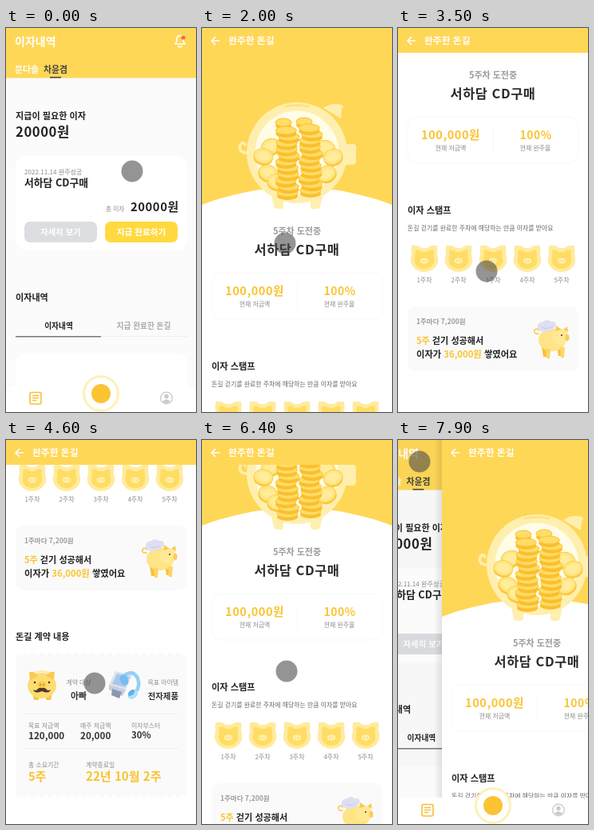
Animation, 238 px wide and 480 px high, one loop 8000 ms. Source, as an HTML page:

```html
<!DOCTYPE html>
<html lang="ko">
<head>
<meta charset="utf-8">
<style>
html, body { margin: 0; width: 100%; height: 100%; overflow: hidden; background: #fff; }
svg { display: block; width: 238px; height: 480px; font-family: "Noto Sans CJK KR", "Noto Sans CJK JP", "Noto Sans CJK", sans-serif; }
.wide { letter-spacing: .035em; }
</style>
</head>
<body>
<svg id="stage" viewBox="0 0 238 480"></svg>
<script>
const YELLOW = '#ffd757', GOLD = '#fac32f', INK = '#222', GRAY = '#8c8c8c', LIGHT = '#9b9b9b';

const text = (x, y, size, str, fill = INK, weight = 700, anchor = 'start') =>
  `<text x="${x}" y="${y}" font-size="${size}" fill="${fill}" font-weight="${weight}" text-anchor="${anchor}">${str}</text>`;
const small = (x, y, str, anchor, size = 7.9) => text(x, y, size, str, GRAY, 400, anchor);
const wide = (...args) => `<g class="wide">${text(...args)}</g>`;
const rect = (x, y, w, h, fill, r = 0, more = '') =>
  `<rect x="${x}" y="${y}" width="${w}" height="${h}" rx="${r}" fill="${fill}" ${more}/>`;
const oval = (x, y, rx, ry, fill, more = '') =>
  `<ellipse cx="${x}" cy="${y}" rx="${rx}" ry="${ry}" fill="${fill}" ${more}/>`;
const dot = (x, y, r, fill, more) => oval(x, y, r, r, fill, more);
const path = (d, fill, more = '') => `<path d="${d}" fill="${fill}" ${more}/>`;
const line = (d, color, width, more = '') =>
  path(d, 'none', `stroke="${color}" stroke-width="${width}" stroke-linecap="round" stroke-linejoin="round" ${more}`);
const range = (n, f) => Array.from({ length: n }, (_, i) => f(i)).join('');

function listPage() {
  return rect(0, 0, 238, 480, '#fbfbfb') + rect(0, 0, 238, 62.5, YELLOW) +
    text(11, 22, 14, '이자내역', '#fff') +
    line('M212 20h12c-2-2-2-4-2-6c0-6-8-6-8 0c0 2 0 4-2 6zM216 23q2 1.5 4 0', '#fff', 1.6) +
    dot(222, 12, 2.6, '#f4694f') +
    text(11, 56, 10.9, '문다솔', '#fff') + text(47, 56, 10.9, '차윤겸', '#444') +
    rect(55, 61, 14, 1.5, '#444') +
    text(12, 114, 11.1, '지급이 필요한 이자') + wide(12, 136, 16.7, '20000원') +
    rect(12, 160, 215, 118, '#fff', 14) +
    small(23, 183, '2022.11.14 완주성공', 'start', 8.1) +
    text(23, 198, 12.8, '서하담 CD구매') +
    small(125, 229, '총 이자', 'start', 7.7) + wide(156, 229, 14.8, '20000원') +
    rect(23, 242, 91, 26, '#dcdde1', 7) + text(68.5, 258.5, 10.4, '자세히 보기', '#fff', 700, 'middle') +
    rect(124, 242, 91, 26, '#ffd93f', 7) + text(169.5, 258.5, 10.6, '지급 완료하기', '#fff', 700, 'middle') +
    text(12, 341, 11.1, '이자내역') +
    text(66, 376, 9.7, '이자내역', INK, 700, 'middle') +
    text(172.5, 376, 9.7, '지급 완료한 돈길', '#aaa', 700, 'middle') +
    rect(119, 385, 108, 1, '#eee') + rect(12, 385, 107, 1.5, '#777') +
    rect(12, 407, 215, 90, '#fff', 12);
}

function navBar() {
  return rect(0, 447, 238, 50, '#fff', 10) +
    line('M32 455.5h10q2 0 2 2v10.500q0 2-2 2h-10q-2 0-2-2v-10.500q0-2 2-2zM33.5 459.5h7M33.5 462.5h7M33.5 465.5h4', '#f7be39', 1.6) +
    dot(119, 457, 21.5, '#fff', 'stroke="#fff0b8" stroke-width="3"') + dot(119, 457, 12, '#fcc433') +
    dot(201, 462.5, 7.3, '#fff', 'stroke="#c9c9ce" stroke-width="1.3"') +
    dot(201, 460.5, 2.7, '#c9c9ce') + path('M196 467q5-5.5 10 0q-5 4-10 0z', '#c9c9ce');
}

const coin = (x, y, rx = 13) =>
  oval(x, y + 4, rx, 5, '#fbbf2e') +
  oval(x, y, rx, 5, '#ffdd66', 'stroke="#fcc437" stroke-width="1"');
const loose = (x, y, turn) => `<g transform="translate(${x} ${y}) rotate(${turn})">` +
  oval(0, 2.5, 12, 9.5, '#fbc63d') + oval(0, 0, 12, 9.5, '#ffe680', 'stroke="#fdce50" stroke-width="1"') +
  oval(0, 0, 8.5, 6, '#ffed9b') + '</g>';
const stack = (x, top, n, step) => range(n, i =>
  coin(x + Math.sin(i * 2.3) * 2, top + (n - 1 - i) * step));

function jar() {
  const pale = '#ffefae';
  return path('M152 100q10-7 23-4q4 2 0 5l-1 12z', pale) +
    path('M178 145h11q4 0 4 4v17q0 5-5 5h-10z', pale) +
    line('M57 156q-12 0-9-10q3-5 6 0', pale, 3.5) +
    path('M87 210l3 13q1 3 4 3h5q3 0 3-4v-8zM151 210l-3 13q-1 3-4 3h-5q-3 0-3-4v-8z', pale) +
    dot(119, 156, 63, pale) + dot(119, 156, 52.5, '#fffce8') +
    line('M104 98q15-3 30 0', '#ffe07c', 2.5) +
    loose(86, 148, -20) + loose(77, 160, 10) + loose(83, 181, 20) + loose(94, 192, 10) +
    loose(155, 150, 20) + loose(164, 161, -15) + loose(156, 182, -25) +
    coin(102, 118, 10) + coin(128, 117, 10) +
    stack(136, 125, 11, 7.8) + stack(107, 128, 11, 7.8);
}

function stamp(i) {
  const x = 33 + 43 * i;
  const head = 'M-15-15q7-1 11 3h8q4-4 11-3q1 6 0 10q3 8-1 14q-5 7-14 7t-14-7q-4-6-1-14q-1-4 0-10z';
  return `<g transform="translate(${x} 483)">` +
    path(head, '#ffeb9e', 'stroke="#ffeb9e" stroke-width="2" stroke-linejoin="round"') +
    path(head, '#ffdc64', 'transform="translate(0 1) scale(.76)"') +
    oval(0, 3, 5.2, 3.8, '#fff0ae') + dot(-1.8, 3, 0.9, '#ffd95a') + dot(1.8, 3, 0.9, '#ffd95a') + '</g>' +
    small(x, 513, `${i + 1}주차`, 'middle', 8);
}

function wingedPig() {
  return line('M176 577q-6 1-5-4q3-4 5 0', '#f9c94c', 1.6) +
    path('M180 594h7l-1 12h-4zM199 592h7l-1 13h-4z', '#f8c13c') +
    oval(193, 585, 17, 14, '#ffe487') + oval(203, 581, 10.5, 10, '#ffe994') +
    path('M197 574l1-7l7 5zM207 572l5-4l1 7z', '#fbcb50') +
    path('M185 596h6l-1 12h-4zM203 594h6l-1 13h-4z', '#fdd666') +
    oval(212, 582, 2.5, 4, '#fbcc54') + dot(205, 579, 1, '#4d3a20') +
    path('M175 571q-2-8 7-9q5-4 9 0q6-1 7 4q-2 6-9 8q-8 3-14-3z', '#dfdff3') +
    line('M180 569q7 4 13-1', '#c9cae9', 1);
}

function dadPig() {
  return path('M33 752h8v9h-6zM50 752h8l-2 9h-6z', '#f9c745') +
    oval(45, 743, 18, 16, '#fddd72') +
    path('M30 736l-1-10q8-1 11 5zM60 736l1-10q-8-1-11 5z', '#fbcb50') +
    oval(45, 742, 6, 4.3, '#fbcb50') + dot(43, 742, 1, '#bd842b') + dot(47, 742, 1, '#bd842b') +
    dot(36, 739, 1.3, '#4b3421') + dot(54, 739, 1.3, '#4b3421') +
    path('M45 746q4-1 6 2q2 2 5 0q-2 6-11 2q-9 4-11-2q3 2 5 0q2-3 6-2z', '#54382a') +
    line('M36 727q9-4 18 0', '#ffe9a4', 2);
}

function gadgets() {
  return path('M137 725l21 5l-8 18l-21-6z', '#dbe4ee') + path('M139 728l16 4l-6 13l-16-4z', '#a9c8e6') +
    path('M129 742l21 6l-4 8l-17-8z', '#c3cfdd') + path('M133 747l12 4l-3 8l-10-4z', '#8997b0') +
    line('M147 731q12-9 18 3q4 10-4 19', '#92d1f7', 4.5) +
    oval(148, 736, 5, 7, '#75bcf0', 'transform="rotate(-25 148 736)"') +
    oval(159, 754, 5, 7, '#b0e0fb', 'transform="rotate(50 159 754)"') +
    oval(157, 752, 3, 5, '#67b0e8', 'transform="rotate(50 157 752)"');
}

function contract() {
  const pair = (x, y, label, value, size, fill) => small(x, y, label) + text(x, y + size + 2, size, value, fill);
  const holes = y => line(`M18 ${y}H222`, '#fff', 6, 'stroke-dasharray="0 10.7"');
  return text(12, 686, 11.1, '돈길 계약 내용') +
    rect(12, 702, 214, 181, '#fafafa', 6) + holes(702) + holes(883) +
    dadPig() + gadgets() +
    small(91, 742, '계약 대상', 'middle') + text(91, 760, 10.8, '아빠', '#333', 700, 'middle') +
    small(216, 742, '목표 아이템', 'end') + text(216, 760, 10.4, '전자제품', '#333', 700, 'end') +
    rect(22, 778, 194, 1, '#eee') + rect(22, 821, 194, 1, '#eee') +
    pair(28, 796, '목표 저금액', '120,000', 11.7, '#333') +
    pair(93, 796, '매주 저금액', '20,000', 11.7, '#333') +
    pair(157, 796, '이자부스터', '30%', 11.4, '#333') +
    pair(28, 845, '총 소요기간', '5주', 14.8, GOLD) +
    pair(100, 845, '계약종료일', '22년 10월 2주', 15.1, GOLD);
}

function detailContent() {
  const gold = str => `<tspan fill="${GOLD}">${str}</tspan>`;
  return rect(0, -10, 238, 300, YELLOW) + dot(119, 532, 333, '#fff') + rect(0, 300, 238, 640, '#fff') +
    jar() +
    text(119, 257.5, 11, '5주차 도전중', LIGHT, 700, 'middle') +
    wide(119, 282.5, 16.4, '서하담 CD구매', '#2b2b2b', 700, 'middle') +
    rect(12, 306, 214, 58, '#fff', 12, 'stroke="#f8f8f8"') + rect(119, 320, 1, 30, '#f7f7f7') +
    wide(66, 333.5, 14.5, '100,000원', GOLD, 700, 'middle') + small(66, 347.5, '현재 저금액', 'middle') +
    wide(172.5, 333.5, 13.9, '100%', GOLD, 700, 'middle') + small(172, 347.5, '현재 완주율', 'middle') +
    text(12, 427, 11.2, '이자 스탬프') +
    text(12, 447.5, 7.9, '돈길 걷기를 완료한 주차에 해당하는 만큼 이자를 받아요', '#666', 400) +
    range(5, stamp) +
    rect(12, 543, 214, 81, '#fafafb', 10) +
    text(23, 565, 8.5, '1주마다 7,200원', LIGHT) +
    text(23, 589.5, 11.1, gold('5주') + ' 걷기 성공해서') +
    text(23, 606.5, 11.3, '이자가 ' + gold('36,000원') + ' 쌓였어요') +
    wingedPig() + contract();
}

const stage = document.getElementById('stage');
stage.innerHTML = `<defs>
  <clipPath id="page"><rect width="238" height="480"/></clipPath>
  <linearGradient id="edge"><stop offset="0" stop-opacity="0"/><stop offset="1" stop-opacity=".1"/></linearGradient></defs>
  <g id="list">${listPage()}</g>
  <rect id="dim" width="238" height="480"/>
  <g id="detail">${rect(-10, 0, 10, 480, 'url(#edge)')}
    <g clip-path="url(#page)"><g id="content">${detailContent()}</g>
    ${rect(0, 0, 238, 31, YELLOW)}
    ${line('M21.5 16h-9M16.5 11.5l-4.5 4.5l4.5 4.5', '#fff', 1.6)}
    ${text(33, 20, 11.8, '완주한 돈길', '#fff')}</g></g>
  <g id="nav">${navBar()}</g>
  <circle id="touch" r="13.5" fill="#464646" opacity=".58"/>`;
const [list, dim, detail, content, nav, touch] =
  ['list', 'dim', 'detail', 'content', 'nav', 'touch'].map(id => document.getElementById(id));

// Tracks: [time, value, ...]
const SLIDE = [[1600, 238], [1700, 150], [1800, 60], [1900, 14], [2000, 0], [7700, 0], [7800, 18], [7900, 55]];
const SCROLL = [[3000, 0], [3100, 12], [3300, 96], [3500, 195], [3700, 276], [3900, 332], [4100, 378],
  [4300, 413], [4500, 433], [4600, 436], [5000, 436], [5100, 418], [5300, 306], [5600, 158], [5800, 130],
  [6000, 120], [6300, 117], [6400, 114], [6500, 76], [6600, 36], [6700, 10], [6800, 0]];
const TOUCH = [[0, 158, 179], [200, 151, 190], [600, 117, 247], [900, 104, 269], [2500, 104, 269],
  [2700, 111, 304], [6200, 111, 304], [6400, 106, 289], [6800, 67, 178], [7200, 38, 68], [7500, 27, 27]];

function at(track, t, k = 1) {
  const i = track.findIndex(p => p[0] > t);
  if (i === 0) return track[0][k];
  if (i < 0) return track[track.length - 1][k];
  const a = track[i - 1], b = track[i];
  return a[k] + (b[k] - a[k]) * (t - a[0]) / (b[0] - a[0]);
}
const move = (el, x, y = 0) => el.setAttribute('transform', `translate(${x} ${y})`);

function draw() {
  const t = Math.floor(performance.now() % 8000 / 100) * 100; // ten steps a second
  const x = at(SLIDE, t), cover = 238 - x;
  move(list, -0.2 * cover);
  dim.setAttribute('opacity', 0.02 * cover / 238);
  move(detail, x);
  detail.setAttribute('visibility', x < 238 ? 'visible' : 'hidden');
  move(content, 0, -at(SCROLL, t));
  nav.setAttribute('visibility', t < 1700 || t >= 7800 ? 'visible' : 'hidden');
  move(touch, at(TOUCH, t), at(TOUCH, t, 2));
  requestAnimationFrame(draw);
}
draw();
</script>
</body>
</html>
```
